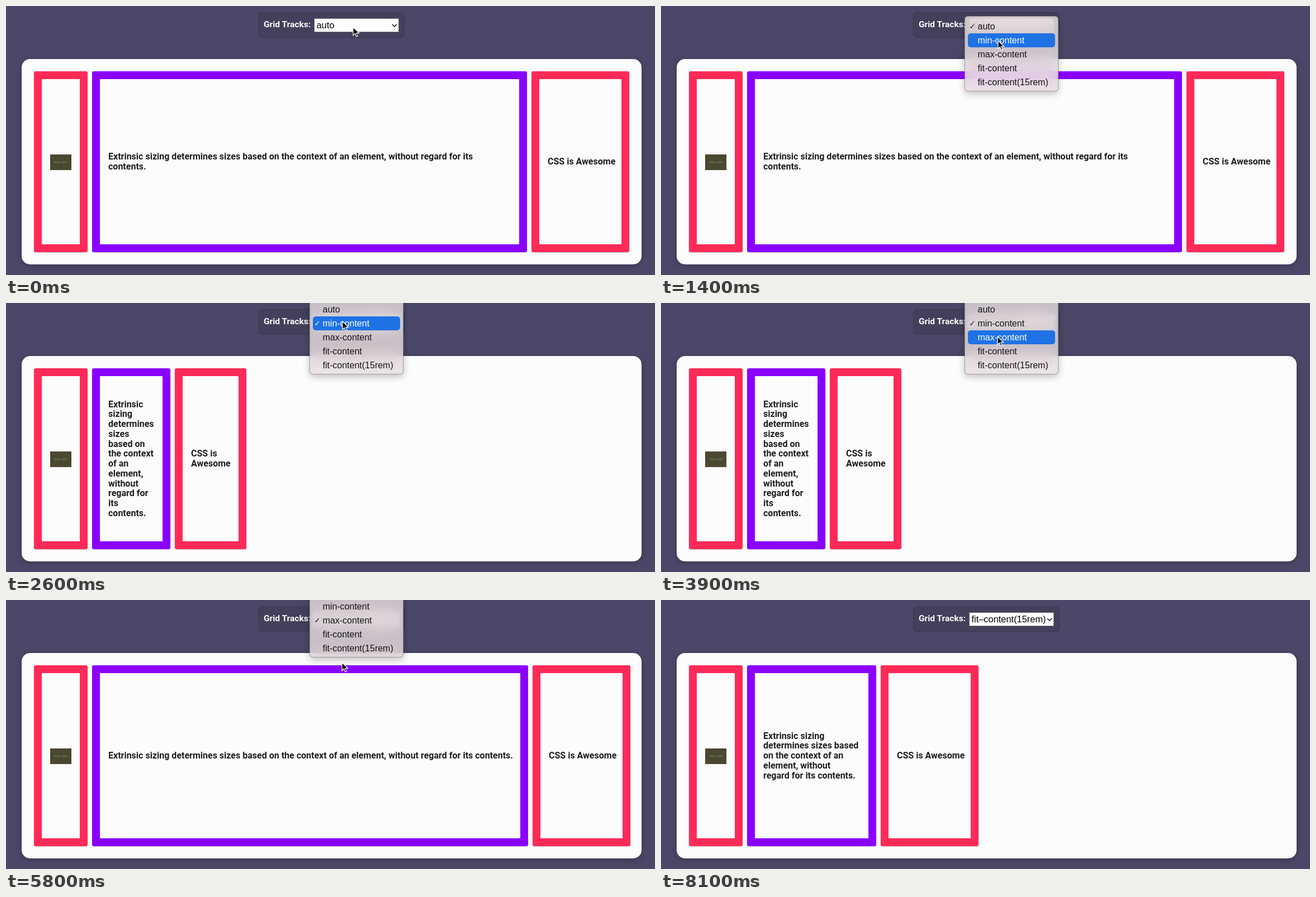
An HTML page that plays this animation: 1161x482 px, repeating every 8400 ms.

```html
<!DOCTYPE html>
<html lang="en">
<head>
<meta charset="utf-8">
<title>Grid Tracks</title>
<style>
  * { box-sizing: border-box; }
  html, body { margin: 0; width: 100%; height: 100%; overflow: hidden; }
  body { position: relative; background: #4a4768; font: 600 16px/17.75px Roboto, sans-serif; color: #1f1d22; }
  .abs { position: absolute; }
  #panel { left: 451px; top: 11px; width: 262px; height: 46px; border: 1px solid #393750; border-radius: 7px; background: #42405b; }
  #label { left: 461px; top: 25px; color: #fcfcfc; font-size: 15.5px; white-space: pre; }
  #select { left: 550.5px; top: 21.5px; width: 152px; height: 25px; border: 1px solid #767676; background: #fff;
    padding-left: 4px; font: 16.4px/23px "Liberation Sans", Arial, sans-serif; color: #000; white-space: pre; }
  #select.ring { border-color: #1c69d8; box-shadow: 0 0 0 1px #1c69d8, 0 0 0 2px #fff; border-radius: 1px; }
  #select svg { position: absolute; right: 2px; top: 9px; }
  #card { left: 28px; top: 95px; width: 1109px; height: 367.5px; padding: 22px; border-radius: 15px; background: #fcfcfc;
    box-shadow: 0 2px 12px rgba(0, 0, 0, .22); display: flex; gap: 8px; }
  .cell { flex: none; height: 324px; border: 14.4px solid #ff2a58; border-radius: 3px; padding-left: 15px;
    display: flex; align-items: center; white-space: pre; box-shadow: 0 .5px 1px rgba(50, 0, 40, .5); }
  #image { width: 96px; }
  #image div { width: 38px; height: 28px; margin-top: 1px; background: #4a4830; color: #85836b; font: 6px/28px Lato, sans-serif; text-align: center; }
  #long { border-color: #8a00ff; }
  #menu { left: 542.5px; width: 168px; height: 135px; padding: 4.5px 5px; border-radius: 6px; background: rgba(232, 220, 222, .8);
    backdrop-filter: blur(14px); border: .5px solid rgba(60, 50, 70, .4); box-shadow: 0 4px 13px rgba(0, 0, 0, .25);
    font: 16px/25px "Liberation Sans", Arial, sans-serif; color: #171417; }
  #menu div { position: relative; height: 25px; padding-left: 18px; border-radius: 5px; white-space: pre; }
  #menu .hover { background: #1f72e4; color: #fff; }
  #menu .checked::before { content: "✓"; position: absolute; left: 3px; font: 13px/25px "DejaVu Sans", sans-serif; }
  #pointer { left: 0; top: 0; overflow: visible; }
</style>
</head>
<body>
<div id="panel" class="abs"></div>
<div id="label" class="abs">Grid Tracks:</div>
<div id="select" class="abs"><span></span><svg width="10" height="7"><path d="M1 1l4 4 4-4" fill="none" stroke="#111" stroke-width="1.5"/></svg></div>
<div id="card" class="abs">
  <div id="image" class="cell"><div>400×300</div></div>
  <div id="long" class="cell"></div>
  <div id="short" class="cell"></div>
</div>
<div id="menu" class="abs"></div>
<svg id="pointer" class="abs" width="12" height="18"><path d="M0 0V14.5L3.4 11.3L5.8 16.8L8.2 15.7L5.9 10.4H10.6Z" fill="#000" stroke="#fff" stroke-width="1.2"/></svg>
<script>
const $ = id => document.getElementById(id);
const DURATION = 8400, ROW = 25;
const OPTIONS = ["auto", "min-content", "max-content", "fit-content", "fit-content(15rem)"];

const SENTENCE = "Extrinsic sizing determines sizes based on the context of an element, without regard for its contents.";
const AWESOME = "CSS is Awesome";
const breakBefore = (text, ...words) => words.reduce((s, w) => s.replace(" " + w, "\n" + w), text);

// Cell widths and line breaks for each option
const LAYOUTS = {
  0: { long: [778, breakBefore(SENTENCE, "contents")], short: [175, AWESOME] },
  1: {
    long: [140, breakBefore(SENTENCE, "sizing", "determines", "sizes", "based", "the", "of", "element", "without", "regard", "its", "contents")],
    short: [128, breakBefore(AWESOME, "Awesome")]
  },
  2: { long: [780, SENTENCE], short: [175, AWESOME] },
  4: { long: [231, breakBefore(SENTENCE, "determines", "on", "element", "regard")], short: [175, AWESOME] }
};

// [time, selected option, menu open, focus ring]
const STATES = [
  [0, 0, 0, 0], [700, 0, 1, 0], [1600, 1, 0, 1], [2200, 1, 1, 1], [4100, 2, 0, 1],
  [5200, 2, 1, 1], [5900, 2, 0, 0], [6800, 2, 1, 0], [7300, 4, 0, 1], [7500, 4, 0, 0]
];

// [time, x, y]
const PATH = [
  [0, 621, 38], [800, 621, 38], [1250, 603, 62], [1700, 603, 62], [2100, 602, 33], [3000, 602, 33],
  [3400, 602, 60], [4100, 602, 60], [4400, 603, 37], [5200, 603, 37], [5600, 601, 112], [5900, 601, 112],
  [6300, 600, 81], [6500, 600, 81], [6750, 603, 37], [6850, 603, 37], [7150, 605, 85], [7350, 605, 85],
  [7600, 790, -25]
];

function pointerAt(t) {
  const next = PATH.findIndex(key => key[0] > t);
  if (next < 0) return PATH.at(-1).slice(1);
  const [t0, x0, y0] = PATH[next - 1], [t1, x1, y1] = PATH[next];
  const p = (t - t0) / (t1 - t0), ease = p * p * (3 - 2 * p);
  return [x0 + (x1 - x0) * ease, y0 + (y1 - y0) * ease];
}

const rows = OPTIONS.map(name => {
  const row = document.createElement("div");
  row.textContent = name;
  $("menu").append(row);
  return row;
});

function setCell(id, [width, text]) {
  $(id).style.width = width + "px";
  if ($(id).textContent !== text) $(id).textContent = text;
}

function draw(now) {
  const t = now % DURATION;
  const [, selected, open, ring] = STATES.findLast(state => state[0] <= t);
  const [x, y] = pointerAt(t);
  const top = 18 - ROW * selected;
  const hovered = Math.floor((y - top - 5) / ROW);

  for (const id of ["long", "short"]) setCell(id, LAYOUTS[selected][id]);
  $("select").firstChild.textContent = OPTIONS[selected].replace("-", "–");
  $("select").classList.toggle("ring", !!ring);
  $("menu").style.display = open ? "block" : "none";
  $("menu").style.top = top + "px";
  rows.forEach((row, i) => {
    row.classList.toggle("checked", i === selected);
    row.classList.toggle("hover", i === hovered);
  });
  $("pointer").style.transform = `translate(${x}px, ${y}px)`;
  requestAnimationFrame(draw);
}
requestAnimationFrame(draw);
</script>
</body>
</html>
```
